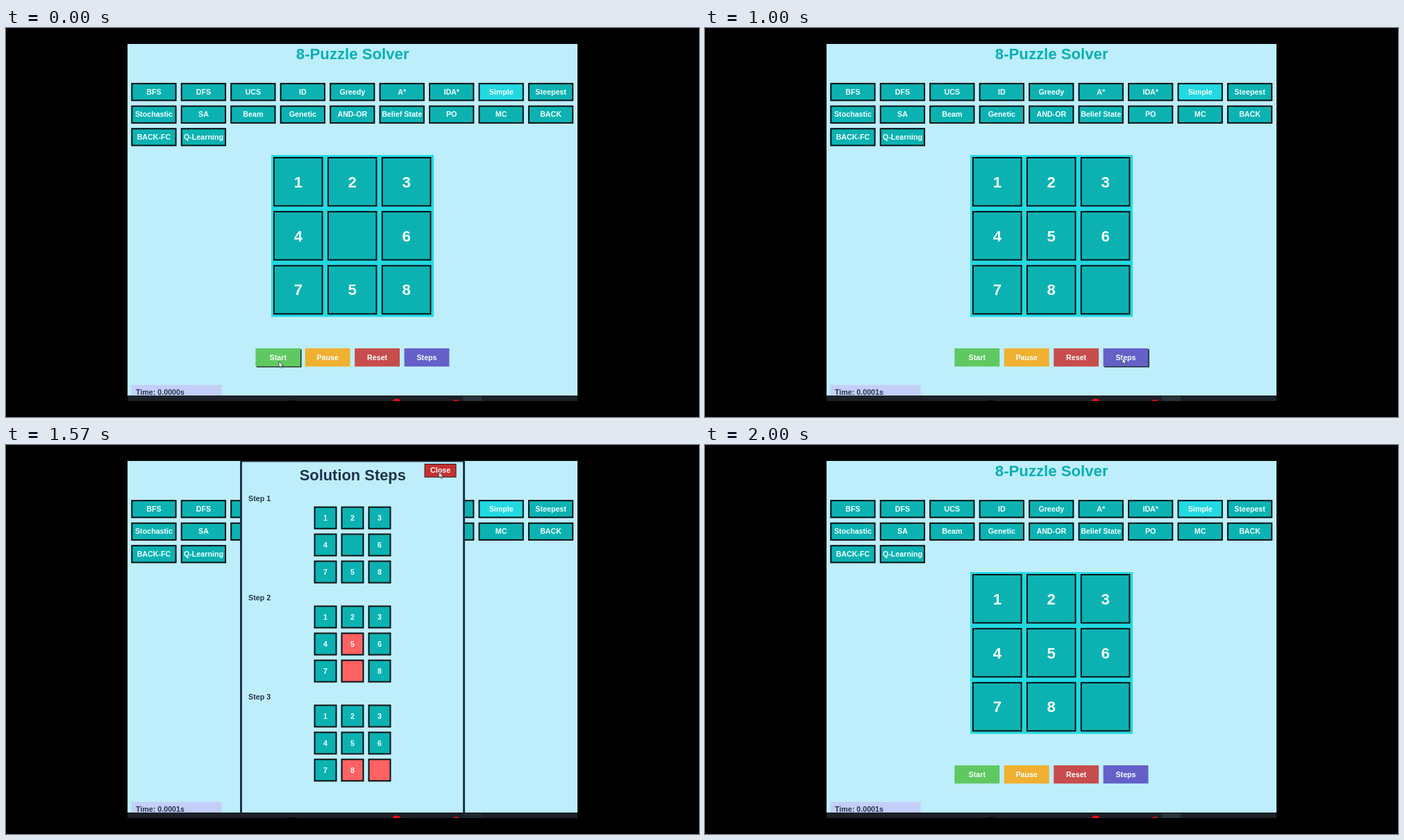
These frames come from a looping animation (998 by 561 pixels, 2.03 s). An HTML page:

```html
<!DOCTYPE html>
<html lang="en">
<head>
<meta charset="utf-8">
<title>8-Puzzle Solver</title>
<style>
  html, body { margin: 0; width: 100%; height: 100%; overflow: hidden; background: #000; }
  svg { display: block; width: 998px; height: 561px; }
  text { font: bold 10.7px "Liberation Sans", Arial, sans-serif; fill: #f4ffff; text-anchor: middle; }
  .big { font-size: 22.2px; }
  .left { text-anchor: start; fill: #26344a; }

  /* Hard on/off changes share one 2030 ms clock */
  .anim { animation: 2030ms step-end infinite; }
  .until-time { animation-name: untilTime; }
  .from-time { animation-name: fromTime; }
  .pose0 { animation-name: pose0; }
  .pose1 { animation-name: pose1; }
  .pose2 { animation-name: pose2; }
  .popup { animation-name: popup; }
  .over0 { animation-name: over0; }
  .over1 { animation-name: over1; }
  .over2 { animation-name: over2; }
  .over3 { animation-name: over3; }
  @keyframes untilTime { 0% { visibility: visible } 4.9%, 100% { visibility: hidden } }
  @keyframes fromTime { 0% { visibility: hidden } 4.9%, 100% { visibility: visible } }
  @keyframes pose0 { 0% { visibility: visible } 19.7%, 100% { visibility: hidden } }
  @keyframes pose1 { 0% { visibility: hidden } 19.7% { visibility: visible } 36.9%, 100% { visibility: hidden } }
  @keyframes pose2 { 0% { visibility: hidden } 36.9%, 100% { visibility: visible } }
  @keyframes popup { 0% { visibility: hidden } 50.6% { visibility: visible } 80.2%, 100% { visibility: hidden } }
  @keyframes over0 { 0% { visibility: visible } 35.2%, 100% { visibility: hidden } }
  @keyframes over1 { 0% { visibility: hidden } 35.5% { visibility: visible } 38.1%, 100% { visibility: hidden } }
  @keyframes over2 { 0% { visibility: hidden } 38.4% { visibility: visible } 41.1%, 100% { visibility: hidden } }
  @keyframes over3 { 0% { visibility: hidden } 42.1% { visibility: visible } 50.6%, 100% { visibility: hidden } }

  .cursor { animation: move 2030ms linear infinite; }
  @keyframes move {
    0%, 34% { transform: translate(393px, 481px) }
    40.89% { transform: translate(565px, 482px) }
    46.5%, 53% { transform: translate(601px, 476px) }
    62.56% { transform: translate(595px, 344px) }
    76.5%, 83% { transform: translate(623.5px, 39px) }
    91%, 100% { transform: translate(628px, 8px) }
  }
</style>
</head>
<body>
<svg id="stage" viewBox="0 0 998 561"></svg>
<script>
const BG = "#beeefc", TEAL = "#0cb2b2", CYAN = "#22d9e2", INK = "#20324c", RED = "#ff6262";
const methods = ["BFS", "DFS", "UCS", "ID", "Greedy", "A*", "IDA*", "Simple", "Steepest",
  "Stochastic", "SA", "Beam", "Genetic", "AND-OR", "Belief State", "PO", "MC", "BACK",
  "BACK-FC", "Q-Learning"];
const controls = [["Start", "#60c860"], ["Pause", "#f0b030"], ["Reset", "#c84c4c"], ["Steps", "#6460c8"]];
const poses = ["1234 6758", "1234567 8", "12345678 "];

const rect = (x, y, w, h, fill) =>
  `<rect x="${x}" y="${y}" width="${w}" height="${h}" fill="${fill}"/>`;
const framed = (x, y, w, h, fill) =>
  `<rect x="${x + 1}" y="${y + 1}" width="${w - 2}" height="${h - 2}" fill="${fill}" stroke="#041012" stroke-width="2"/>`;
const text = (x, y, s, attrs = "") => `<text x="${x}" y="${y}" ${attrs}>${s}</text>`;
const group = (names, body) => `<g class="anim ${names}">${body}</g>`;

function methodButton(name, i) {
  const x = 180.3 + (i % 9) * 71.45, y = 79.2 + Math.floor(i / 9) * 32.5;
  return framed(x, y, 65.3, 26.2, name === "Simple" ? CYAN : TEAL) + text(x + 32.7, y + 16.6, name);
}

function controlButton([name, fill], i) {
  const x = 359.4 + i * 71.4;
  return group("over" + i, rect(x + 1.3, 463.3, 64.8, 26, "#081008"))
    + rect(x, 462, 64.8, 26.2, fill) + text(x + 32.4, 478.8, name);
}

function board(pose) {
  return [...pose].map((n, i) => {
    const x = 385 + (i % 3) * 77.9, y = 186 + Math.floor(i / 3) * 77.9;
    return framed(x, y, 71.6, 71.5, TEAL) + text(x + 35.8, y + 43.6, n, 'class="big"');
  }).join("");
}

function step(pose, k) {
  const top = 88.6 + k * 142.9;
  const cells = [...pose].map((n, i) => {
    const x = 443.5 + (i % 3) * 39, y = top + Math.floor(i / 3) * 39;
    const moved = k > 0 && n !== poses[k - 1][i];
    return framed(x, y, 33, 33, moved ? RED : TEAL) + text(x + 16.5, y + 20.2, n);
  });
  return text(349, top - 7.4, "Step " + (k + 1), 'class="left"') + cells.join("");
}

const timer = s => text(187, 529, `Time: ${s}s`, 'class="left"');

const taskbar = rect(175, 530, 648, 8, "#1b2127")
  + rect(658, 531, 27, 7, "#29333b")
  + rect(405, 537, 12, 1, "#080a0c")
  + '<ellipse cx="562.5" cy="538" rx="5.5" ry="3.5" fill="#f00c16"/>'
  + '<ellipse cx="648" cy="538" rx="4" ry="2" fill="#e00c16"/>';

const popup = rect(337, 23, 324, 507, INK) + rect(340, 24.5, 318, 505.5, BG)
  + text(499.3, 51.3, "Solution Steps", `class="big" style="fill:${INK};font-size:21.9px"`)
  + rect(602.5, 27, 46, 19.8, "#30202a") + rect(603.5, 28, 44, 17.8, "#c83030")
  + text(625.6, 40.4, "Close")
  + poses.map(step).join("")
  + rect(658, 531, 27, 7, "#212930");

document.getElementById("stage").innerHTML =
  `<clipPath id="screen">${rect(175, 23, 648, 515, "#fff")}</clipPath><g clip-path="url(#screen)">`
  + rect(175, 23, 648, 515, BG)
  + text(499.2, 44.8, "8-Puzzle Solver", 'class="big" style="fill:#06b0b4"')
  + methods.map(methodButton).join("")
  + rect(382, 183.2, 234, 233.4, CYAN)
  + poses.map((p, k) => group("pose" + k, board(p))).join("")
  + controls.map(controlButton).join("")
  + rect(180.5, 514.8, 130, 15.2, "#c3cff9")
  + group("until-time", timer("0.0000")) + group("from-time", timer("0.0001"))
  + taskbar
  + group("popup", popup)
  + '<path class="cursor" d="M0 0V8.3L2 6.6L3.5 9.6L5 8.9L3.6 6H6.2Z" fill="#fff" stroke="#24343c" stroke-width=".8"/>'
  + "</g>";
</script>
</body>
</html>
```
